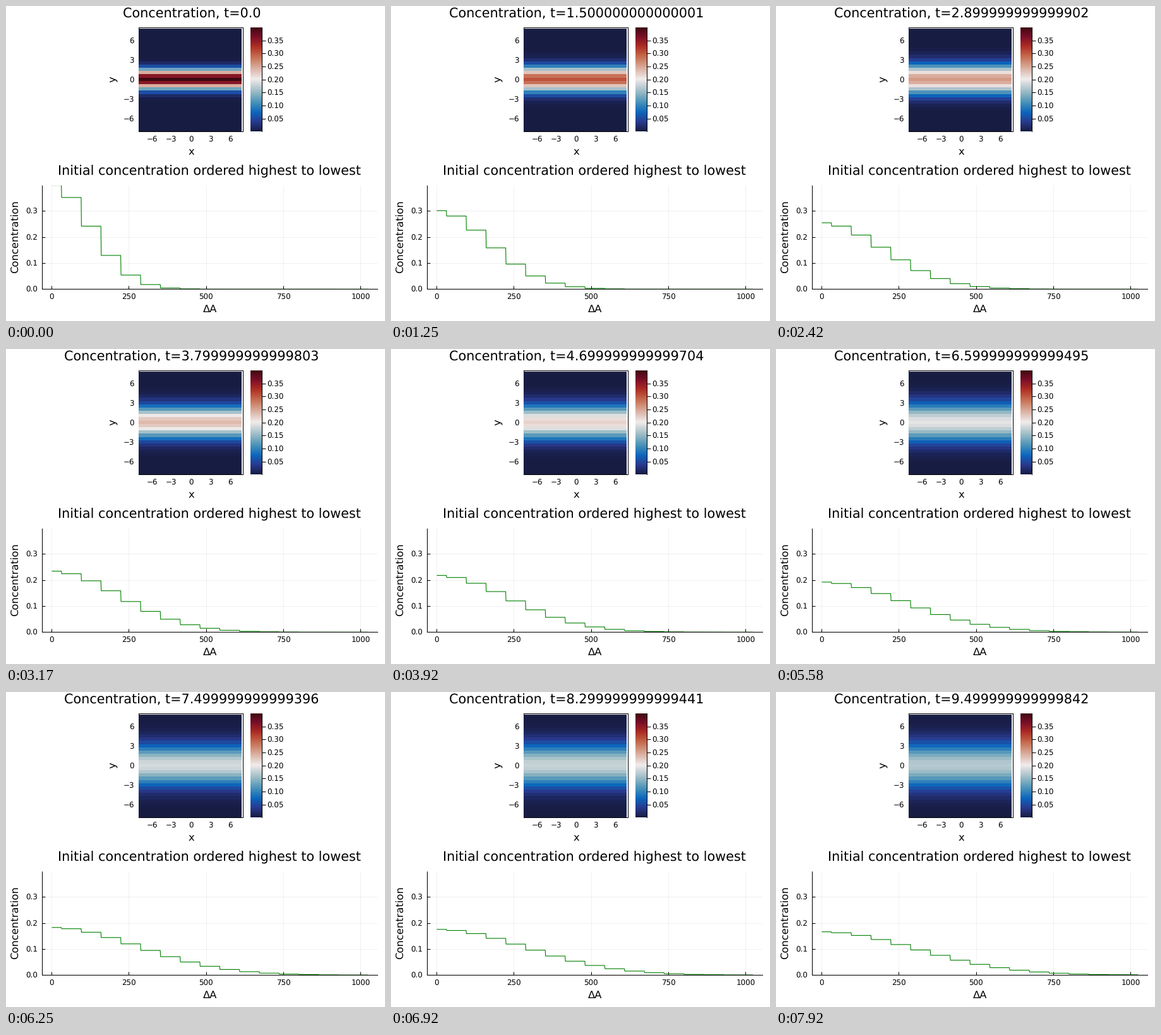
These frames come from a looping animation (600 px wide and 500 px high, 8 s). A matplotlib script:

```python
import numpy as np
import matplotlib.pyplot as plt
from matplotlib.animation import FuncAnimation
from matplotlib.colors import LinearSegmentedColormap

W, H, DPI = 600, 500, 100
FRAMES, LOOP_MS = 96, 8000
DT, STEPS = 0.002, 50          # solver step, steps per frame
PEAK = 1 / np.sqrt(2 * np.pi)
TITLE, GUIDE, TICK = 20.8, 16.34, 11.88   # text sizes in pixels
DROP = 4.8                     # from a tick to its label's baseline

plt.rcParams.update({
    "font.family": "DejaVu Sans",
    "text.hinting": "none",
    "axes.linewidth": 0.75,
})

BLUES = [(23, 28, 66), (41, 58, 143), (11, 102, 189),
         (69, 144, 185), (142, 181, 194), (210, 216, 219)]
REDS = [(230, 210, 204), (213, 157, 137), (196, 101, 72),
        (172, 43, 36), (120, 14, 40), (60, 9, 17)]


def balance_map():
    pos = [i / 11 for i in range(6)] + [0.5] + [i / 11 for i in range(6, 12)]
    cols = BLUES + [(241, 236, 235)] + REDS
    stops = [(p, tuple(v / 255 for v in c)) for p, c in zip(pos, cols)]
    return LinearSegmentedColormap.from_list("balance", stops, N=256)


def elapsed_times():
    """Running sum of the solver step, sampled once per frame."""
    out, t = [], 0.0
    for _ in range(FRAMES):
        out.append(t)
        for _ in range(STEPS):
            t += DT
    return out


fig = plt.figure(figsize=(W / DPI, H / DPI), dpi=DPI, facecolor="white")


def axes_px(left, top, right, bottom):
    ax = fig.add_axes([left / W, 1 - bottom / H,
                       (right - left) / W, (bottom - top) / H])
    ax.set_xticks([])
    ax.set_yticks([])
    return ax


def label(x, y, s, size, ha="center"):
    return fig.text(x / W, 1 - y / H, s, fontsize=size * 72 / DPI,
                    ha=ha, va="baseline")


def side_label(x, y, s):
    """Vertical axis name whose baseline lies at x."""
    fig.text(x / W, 1 - y / H, s, fontsize=GUIDE * 72 / DPI, rotation=90,
             rotation_mode="anchor", ha="center", va="baseline")


def signed(v):
    return str(v).replace("-", "\u2212")


cmap = balance_map()
times = elapsed_times()
y = np.arange(-8, 8, 0.5)


def profile(t):
    """Spreading Gaussian on a periodic strip."""
    var = 1 + t / 2
    total = sum(np.exp(-(y + s) ** 2 / (2 * var)) for s in (-16, 0, 16))
    return PEAK / np.sqrt(var) * total


# Concentration map
L, T, R, B = 210.4, 34.4, 375.4, 199.4
heat_ax = axes_px(L, T, R, B)
image = heat_ax.imshow(np.zeros((32, 32)), cmap=cmap, vmin=0, vmax=PEAK,
                       extent=(-8.25, 7.75, -8.25, 7.75), origin="lower",
                       aspect="auto", interpolation="nearest", zorder=3)
heat_ax.set(xlim=(-8, 8), ylim=(-8, 8))
heat_ax.set_xticks([])
heat_ax.set_yticks([])
for v in range(-6, 7, 3):
    label(L + (v + 8) / 16 * (R - L), 216, signed(v), TICK)
    label(203, B - (v + 8) / 16 * (B - T) + DROP, signed(v), TICK, ha="right")
label(293, 236, "x", GUIDE)
side_label(174.5, 116.2, "y")
title = label(293.8, 19, "", TITLE)

# Colour bar
bar_ax = axes_px(387.4, T, 405.4, B)
bar_ax.imshow(np.arange(256)[:, None], cmap=cmap, origin="lower",
              aspect="auto", extent=(0, 1, 0, PEAK), interpolation="nearest")
bar_ax.set_xticks([])
for side in ("left", "top", "bottom"):
    bar_ax.spines[side].set_visible(False)
bar_ax.yaxis.tick_right()
bar_ticks = np.arange(1, 8) * 0.05
bar_ax.set_yticks(bar_ticks)
bar_ax.tick_params(axis="y", length=4, width=0.75, labelright=False)
for v in bar_ticks:
    label(413.5, B - v / PEAK * (B - T) + DROP, f"{v:.2f}", TICK, ha="left")

# Ordered concentration
L2, T2, R2, B2 = 57.4, 284.6, 588.2, 449.4
line_ax = axes_px(L2, T2, R2, B2)
lo, hi = 1 - 0.03 * 1023, 1024 + 0.03 * 1023
line_ax.set(xlim=(lo, hi), ylim=(0, PEAK))
line_ax.set_axisbelow(True)
for side in ("top", "right"):
    line_ax.spines[side].set_visible(False)
x_ticks = range(0, 1001, 250)
y_ticks = [0, 0.1, 0.2, 0.3]
line_ax.set_xticks(x_ticks)
line_ax.set_yticks(y_ticks)
line_ax.tick_params(direction="in", length=3.4, width=0.75,
                    labelleft=False, labelbottom=False)
line_ax.grid(color="black", alpha=0.07, linewidth=0.6)
for v in x_ticks:
    label(L2 + (v - lo) / (hi - lo) * (R2 - L2), 466, str(v), TICK)
for v in y_ticks:
    label(50, B2 - v / PEAK * (B2 - T2) + DROP, f"{v:.1f}", TICK, ha="right")
label(321.8, 269, "Initial concentration ordered highest to lowest", TITLE)
label(323, 486, "\u0394A", GUIDE)
side_label(18.5, 366, "Concentration")
curve, = line_ax.plot([], [], color="green", linewidth=0.8, zorder=2.2,
                      solid_capstyle="butt")


def draw(i):
    c = profile(times[i])
    image.set_data(np.tile(c[:, None], (1, 32)))
    curve.set_data(np.arange(1, 1025), np.sort(np.repeat(c, 32))[::-1])
    title.set_text(f"Concentration, t={times[i]}")
    return image, curve, title


anim = FuncAnimation(fig, draw, frames=FRAMES, interval=LOOP_MS / FRAMES,
                     repeat=True, repeat_delay=0, blit=False)
plt.show()
```
